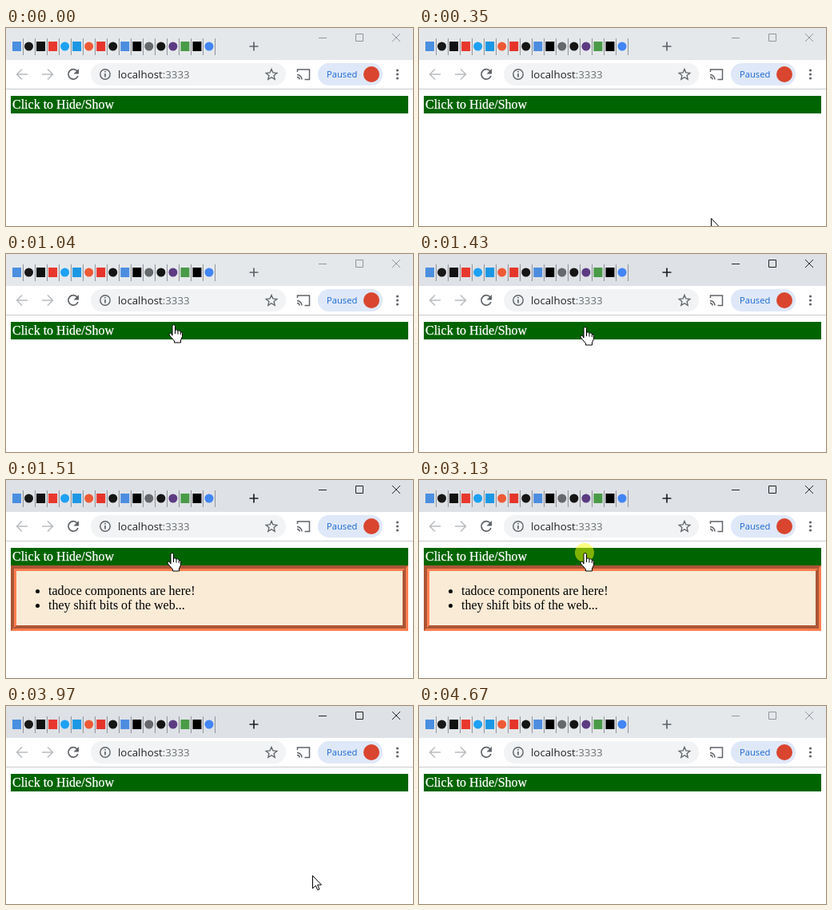
An HTML page for the animation above (4750 ms loop, 509 by 248 pixels).

```html
<!DOCTYPE html>
<html lang="en">
<head>
<meta charset="utf-8">
<title>Hide/Show panel</title>
<style>
  html, body { margin: 0; width: 100%; height: 100%; overflow: hidden; background: #fff; }
  svg { position: absolute; left: 0; top: 0; width: 509px; height: 248px; overflow: hidden; }
  .ui { font-family: "Open Sans", sans-serif; }
  .page { position: absolute; left: 6px; top: 85px; width: 497px; font: 16px/18px "Liberation Serif", "Times New Roman", serif; }
  .bar { height: 18px; padding: 2px; background: #006400; color: #fff; -webkit-text-stroke: .25px #fff; }
  .panel { border: 7px groove coral; background: antiquewhite; color: #000; }
  .panel ul { margin: 16px 0; padding-left: 40px; }
  .line { fill: none; stroke: #5f6368; stroke-width: 1.7; }
  .faded { stroke: #b9bcc0; stroke-width: 1.5; }
  .strip { fill: #e5e8eb; }
  .plus { fill: none; stroke: #5f6368; stroke-width: 1.7; }
  .controls { fill: none; stroke: #929599; }
  .active .strip { fill: #dee1e6; }
  .active .plus { stroke: #202124; }
  .active .controls { stroke: #222; }
  .pointer { fill: #fff; stroke: #000; stroke-linejoin: round; }
</style>
</head>
<body>
<svg class="ui" id="browser" viewBox="0 0 509 248">
  <rect class="strip" width="509" height="40"/>
  <g id="tabs"></g>
  <path class="plus" d="M304.500 23h11M310 17.500v11"/>
  <path class="controls" d="M391 12.500h10M437.500 7.500h9v9h-9zM483 7l10 10M493 7l-10 10"/>
  <path d="M0 76.500h509" stroke="#c9cbce"/>

  <path class="line faded" d="M27 58H14M20 51.500L13.500 58l6.500 6.500M45 58h13M52 51.500l6.500 6.500-6.500 6.500"/>
  <path class="line" d="M89 54a6.200 6.200 0 1 0 1 6"/>
  <path d="M91 51v6.500h-6.500z" fill="#5f6368"/>
  <rect x="106" y="44" width="244" height="28" rx="14" fill="#f1f3f4"/>
  <circle class="line" cx="124" cy="58" r="6.200" style="stroke-width:1.4"/>
  <path class="line" d="M124 57v4.500M124 54v1.600"/>
  <text x="140" y="63" font-size="13.300" fill="#202124">localhost<tspan fill="#6c7074">:3333</tspan></text>
  <path class="line" style="stroke-width:1.3" d="M332 51.500l1.900 4.500 4.900.4-3.700 3.200 1.100 4.800-4.200-2.600-4.200 2.600 1.100-4.800-3.700-3.200 4.900-.4z"/>
  <path class="line" style="stroke-width:1.500" d="M364.500 55v-3h15v12.500h-6M364 58.500a6 6 0 0 1 6 6M364 61.500a3 3 0 0 1 3 3"/>
  <rect x="390" y="44" width="81" height="28" rx="14" fill="#dfe8f8"/>
  <text x="401" y="62" font-size="11.200" fill="#1967d2">Paused</text>
  <circle cx="457" cy="58" r="10" fill="#d9452f"/>
  <g fill="#5f6368">
    <circle cx="489.500" cy="53" r="1.600"/>
    <circle cx="489.500" cy="58" r="1.600"/>
    <circle cx="489.500" cy="63" r="1.600"/>
  </g>
</svg>

<div class="page">
  <div class="bar">Click to Hide/Show</div>
  <div class="panel" id="panel">
    <ul><li>tadoce components are here!</li><li>they shift bits of the web...</li></ul>
  </div>
</div>

<svg viewBox="0 0 509 248">
  <circle id="click" cx="207" cy="91" r="12" fill="#ff0" opacity=".5"/>
  <path id="arrow" class="pointer" d="M.5.5V16.500L4.300 13 6.800 18.500 9 17.500 6.600 12H11.500Z"/>
  <g id="hand" class="pointer">
    <path d="M-1 14V2.500Q-1 .5.700 .5T2.500 2.500V8Q2.700 6.700 4.200 6.800T6 8.600Q6.500 7.600 7.700 7.800T9.300 9.600Q11.500 8.800 11.500 11.500V15.500L9.500 20V23H1.500V21L-4 14.500Q-6 12-4.200 11T-1 14Z"/>
    <path fill="none" d="M2.500 8v4M6 8.600v4M9.300 9.600V13"/>
  </g>
</svg>

<script>
const LOOP = 4750;
const el = id => document.getElementById(id);
const within = (t, from, to) => t >= from && t < to;
const show = (id, on) => { el(id).style.visibility = on ? "visible" : "hidden"; };

const iconColors = ["#4a8fe0", "#181818", "#111", "#e8382d", "#1da1f2", "#1c97e3",
  "#ee5a35", "#e5352b", "#151515", "#4c8de0", "#000", "#66686b",
  "#151515", "#5c3b82", "#4a9b48", "#000", "#4285f4"];
const roundIcons = [1, 4, 6, 8, 11, 12, 13, 16];

el("tabs").innerHTML = iconColors.map((color, i) => {
  const x = 13.5 + 15.03 * i;
  const icon = roundIcons.includes(i)
    ? `<circle cx="${x}" cy="23" r="5.5" fill="${color}"/>`
    : `<rect x="${x - 5.5}" y="17" width="11" height="12" fill="${color}"/>`;
  return `${icon}<path d="M${Math.round(x + 7) + .5} 13v21" stroke="#909398"/>`;
}).join("");

// Pointer steps: start time, hot spot x and y, shape
const pointerSteps = [
  [0, 0, 0, ""],
  [280, 365, 238, "arrow"], [360, 333, 221, "arrow"], [430, 302, 201, "arrow"],
  [500, 273, 182, "arrow"], [580, 247, 164, "arrow"], [660, 232, 141, "arrow"],
  [740, 222, 121, "arrow"], [810, 216, 97, "hand"], [890, 212, 84, "arrow"],
  [1040, 209, 88, "hand"], [1120, 207, 91, "hand"],
  [3660, 212, 96, "hand"], [3740, 242, 124, "arrow"], [3820, 290, 157, "arrow"],
  [3890, 339, 188, "arrow"], [3970, 383, 212, "arrow"], [4040, 417, 230, "arrow"],
  [4120, 442, 243, "arrow"], [4200, 445, 243, "arrow"], [4280, 0, 0, ""]
];

function draw(t) {
  const [, x, y, shape] = pointerSteps.findLast(step => step[0] <= t);
  for (const id of ["arrow", "hand"]) {
    show(id, id === shape);
    el(id).setAttribute("transform", `translate(${x} ${y})`);
  }
  show("panel", within(t, 1510, 3280));
  show("click", within(t, 1270, 1430) || within(t, 3130, 3280));
  el("browser").classList.toggle("active", within(t, 1350, 4670));
}

const start = performance.now();
function tick() {
  draw((performance.now() - start) % LOOP);
  requestAnimationFrame(tick);
}
tick();
</script>
</body>
</html>
```
